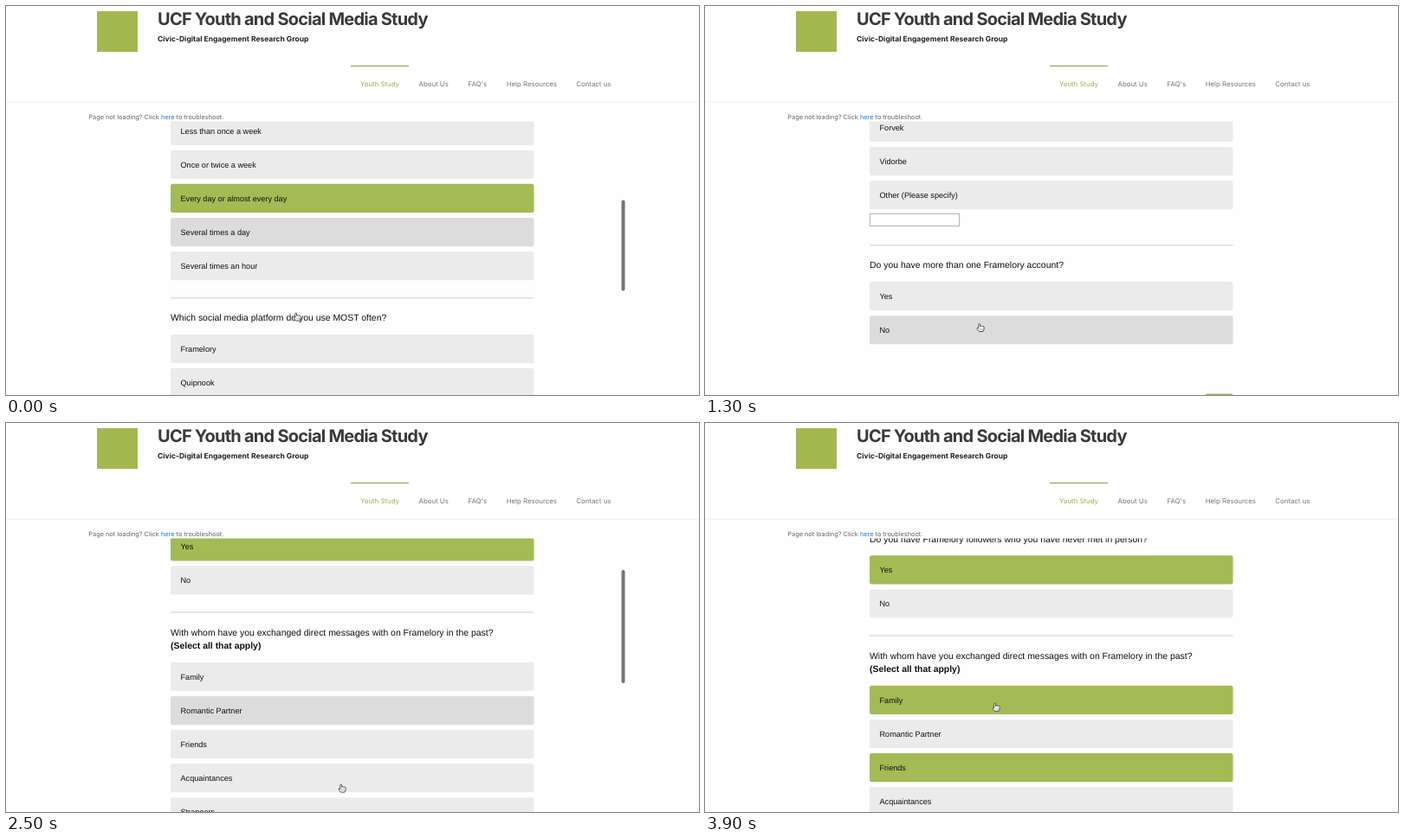
Write an HTML page that moves like this. It is 800 px wide and 450 px high and loops after 4 s.

```html
<!DOCTYPE html>
<html lang="en">
<head>
<meta charset="utf-8">
<title>Youth and Social Media Study</title>
<style>
  html, body { margin: 0; width: 100%; height: 100%; overflow: hidden; background: #fefefe; }
  svg { display: block; width: 800px; height: 450px; text-rendering: geometricPrecision; }
  .ui { font-family: Inter, Roboto, sans-serif; }
  .form { font-family: "Liberation Sans", Arial, sans-serif; fill: #111; }
  .title { font-size: 20px; font-weight: 650; letter-spacing: -.76px; fill: #3a3a3a; }
  .lab { font-size: 8.5px; font-weight: 700; fill: #222; }
  .nav { font-size: 7.85px; fill: #757575; }
  .nav.active { fill: #9bad50; }
  .hint { font-size: 7.36px; fill: #666; }
  .hint tspan { fill: #1b78e8; }
  .option { font-size: 9.15px; }
  .question { font-size: 10.45px; }
  .strong { font-weight: 700; }
</style>
</head>
<body>
<svg id="stage" viewBox="0 0 800 450">
  <clipPath id="view"><rect x="0" y="133.5" width="800" height="316.5"/></clipPath>
  <rect width="800" height="111" fill="#fff"/>
  <rect y="110.5" width="800" height="1" fill="#ededed"/>
  <rect x="105" y="6" width="47" height="47" fill="#a3b84f"/>
  <g class="ui" id="header">
    <text class="title" x="175" y="21.8">UCF Youth and Social Media Study</text>
    <text class="lab" x="175" y="41.2">Civic-Digital Engagement Research Group</text>
    <rect x="398" y="68.7" width="67" height="1.5" fill="#a3b26a"/>
    <text class="hint" x="95.3" y="130.8">Page not loading? Click <tspan>here</tspan> to troubleshoot.</text>
  </g>
  <g class="form" id="form" clip-path="url(#view)"></g>
  <rect id="bar" x="710.5" width="4" rx="2" fill="#747474"/>
  <g id="cursor">
    <path d="M-2.2 1.2V-3.6a.9.9 0 0 1 1.8 0V-1.2a.85.85 0 0 1 1.6 0a.85.85 0 0 1 1.5.3a.75.75 0 0 1 1.4.5V2.2L3 4.6H-1.5L-4 1.4a.9.9 0 0 1 1.3-1Z"
      fill="#fff" stroke="#444" stroke-width=".9" stroke-linejoin="round"/>
    <path d="M-.3 1V3M1.2 1V3M2.6 1V3" stroke="#777" stroke-width=".5"/>
  </g>
</svg>
<script>
const GREEN = '#a4ba54', GREY = '#ebebeb', HOVER = '#dcdcdc';
const LEFT = 190, WIDTH = 419.5, PITCH = 39.08, ROW = 33.2;
const $ = id => document.getElementById(id);

function add(parent, tag, attrs, text) {
  const el = document.createElementNS('http://www.w3.org/2000/svg', tag);
  for (const key in attrs) el.setAttribute(key, attrs[key]);
  if (text) el.textContent = text;
  parent.append(el);
  return el;
}

[['Youth Study', 409], ['About Us', 476.5], ['FAQ\'s', 533.5], ['Help Resources', 577.7], ['Contact us', 658.3]]
  .forEach(([label, x], i) => add($('header'), 'text', { class: i ? 'nav' : 'nav active', x, y: 93.4 }, label));

// A page lays its parts out downwards; y is the top of the next option.
function makePage(y, barTop, barHeight, barRate) {
  const group = add($('form'), 'g', {});
  const page = { group, rows: {}, barTop, barHeight, barRate };
  page.line = (text, middle, extra = '') =>
    add(group, 'text', { class: 'question ' + extra, x: LEFT, y: middle + 3.7 }, text);
  page.options = (...labels) => {
    for (const label of labels) {
      page.rows[label] = add(group, 'rect', { x: LEFT, y, width: WIDTH, height: ROW, rx: 2.5 });
      add(group, 'text', { class: 'option', x: 201.5, y: y + 19.9 }, label);
      y += PITCH;
    }
  };
  page.input = () => {
    add(group, 'rect', { x: LEFT + .5, y: y - .7, width: 103, height: 14, fill: '#fff', stroke: '#b4b4b4' });
    y += 21;
  };
  page.ask = (text, more) => {
    const rule = y + 14.4;
    add(group, 'rect', { x: LEFT, y: rule - .5, width: WIDTH, height: 1.3, fill: '#d9d9d9' });
    page.line(text, rule + 23);
    if (more) page.line(more, rule + 38.5, 'strong');
    y = rule + (more ? 58 : 42.5);
  };
  page.next = () => {
    const top = y + 51.4;
    add(group, 'rect', { x: 577.5, y: top, width: 32, height: 28, rx: 2, fill: GREEN });
    add(group, 'text', { class: 'option', x: 593.5, y: top + 17, 'text-anchor': 'middle', fill: '#fff' }, 'Next');
  };
  return page;
}

const first = makePage(127.7, 224.5, 105, .307);
first.options('Less than once a week', 'Once or twice a week', 'Every day or almost every day',
  'Several times a day', 'Several times an hour');
first.ask('Which social media platform do you use MOST often?');
first.options('Framelory', 'Quipnook', 'Palhaven', 'Tattlin', 'Forvek', 'Vidorbe', 'Other (Please specify)');
first.input();
first.ask('Do you have more than one Framelory account?');
first.options('Yes', 'No');
first.next();

const second = makePage(218.9, 134.5, 131, .383);
second.line('Please answer the following questions based on your primary Framelory account that you', 153);
second.line('are using for this study.', 168.5);
second.line('Do you have Framelory followers who you have never met in person?', 199.5);
second.options('Yes', 'No');
second.ask('With whom have you exchanged direct messages with on Framelory in the past?', '(Select all that apply)');
second.options('Family', 'Romantic Partner', 'Friends', 'Acquaintances', 'Strangers', 'Other (Please specify)');
second.input();
second.ask('How often do you use disappearing messages on Framelory?');
second.options('Never');

// Each step names only what changes at that time.
const steps = [
  [0, { page: first, scroll: 0, at: [336, 359.5], hover: 'Several times a day', picked: ['Every day or almost every day'], bar: 1 }],
  [100, { scroll: 62 }],
  [200, { scroll: 96.6, hover: '' }],
  [300, { at: [330, 315], hover: 'Framelory', bar: .5 }],
  [400, { at: [326, 301], picked: ['Every day or almost every day', 'Framelory'], bar: 0 }],
  [500, { at: [342, 391], hover: 'Palhaven' }],
  [600, { scroll: 150, bar: 1 }],
  [700, { scroll: 245 }],
  [800, { scroll: 330 }],
  [900, { scroll: 385, hover: '' }],
  [1000, { scroll: 412.4 }],
  [1100, { bar: .5 }],
  [1200, { at: [328, 381], hover: 'No', bar: 0 }],
  [1300, { at: [318, 372] }],
  [1400, { picked: ['Every day or almost every day', 'Framelory', 'No'] }],
  [1500, { scroll: 440, hover: '', bar: 1 }],
  [1600, { scroll: 457.4, at: [430, 395] }],
  [1700, { at: [594, 425] }],
  [1800, { page: second, scroll: 0, picked: [], bar: 1 }],
  [1900, { at: [520, 345], bar: .5 }],
  [2000, { at: [430, 258], hover: 'No', bar: 0 }],
  [2100, { at: [394, 224.7], hover: 'Yes' }],
  [2400, { scroll: 30, at: [388, 422.5], hover: 'Romantic Partner', picked: ['Yes'], bar: 1 }],
  [2500, { scroll: 92.6 }],
  [2600, { hover: 'Acquaintances', bar: .5 }],
  [2700, { at: [365, 372], hover: 'Friends', bar: 0 }],
  [3100, { picked: ['Yes', 'Friends'] }],
  [3200, { at: [341, 328.7], hover: '' }],
  [3300, { scroll: 140, bar: 1 }],
  [3400, { scroll: 215 }],
  [3500, { scroll: 244 }],
  [3600, { scroll: 150 }],
  [3700, { scroll: 65.6 }],
  [3800, { at: [336, 328.7], hover: 'Family', bar: .5 }],
  [3900, { picked: ['Yes', 'Friends', 'Family'], bar: 0 }]
];

const LOOP = 4000;
const set = (el, attrs) => { for (const key in attrs) el.setAttribute(key, attrs[key]); };

function draw(time) {
  const { page, scroll, at, hover, picked, bar } =
    Object.assign({}, ...steps.filter(([start]) => start <= time).map(([, change]) => change));
  for (const p of [first, second]) set(p.group, { display: p === page ? 'inline' : 'none' });
  set(page.group, { transform: `translate(0 ${-scroll})` });
  for (const label in page.rows) {
    const fill = picked.includes(label) ? GREEN : label === hover ? HOVER : GREY;
    set(page.rows[label], { fill });
  }
  set($('bar'), { y: page.barTop + scroll * page.barRate, height: page.barHeight, opacity: bar });
  set($('cursor'), { transform: `translate(${at})` });
}

const began = performance.now();
function tick() {
  draw((performance.now() - began) % LOOP);
  requestAnimationFrame(tick);
}
tick();
</script>
</body>
</html>
```
